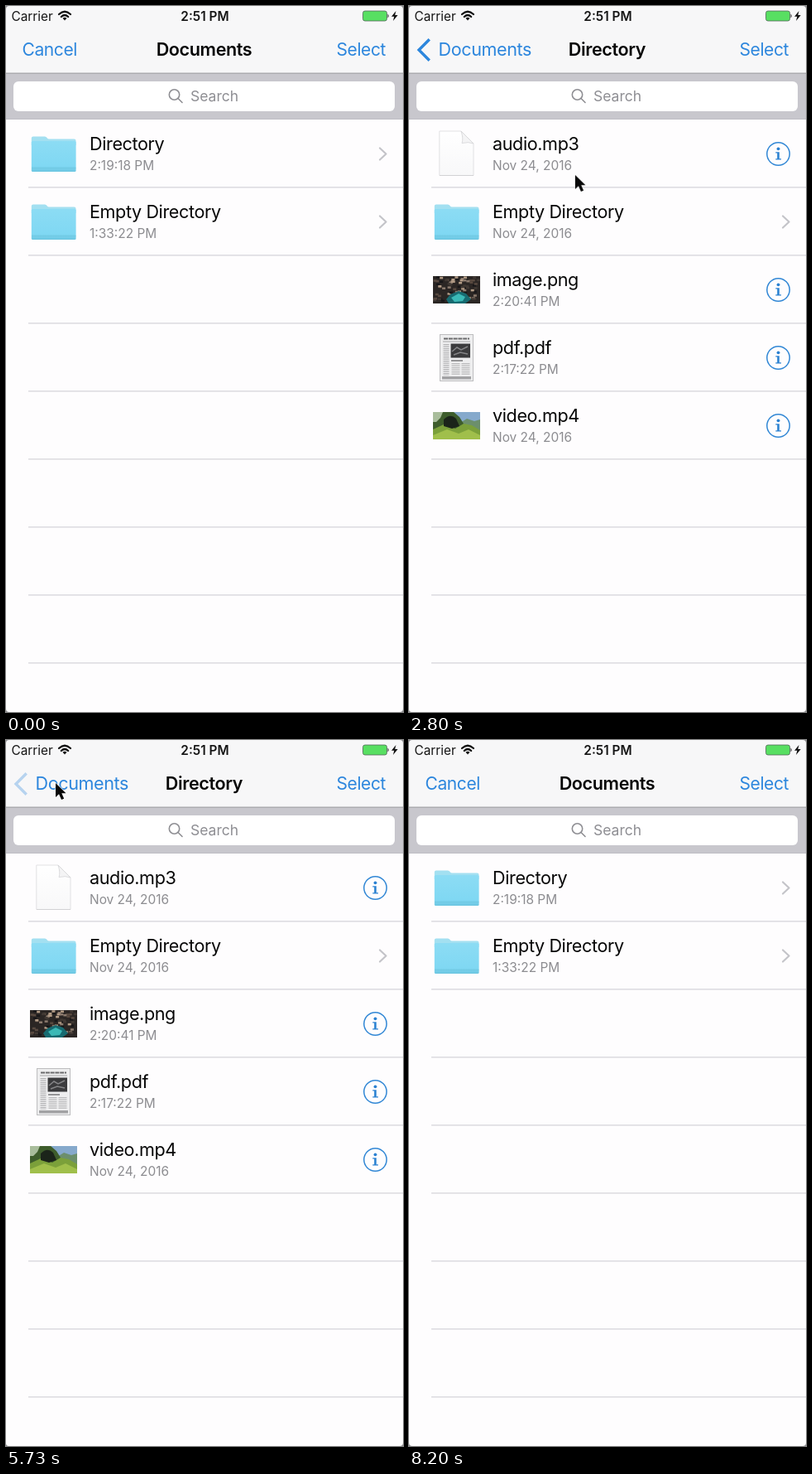
An HTML page for the animation above (8270 ms loop, 480 px wide and 852 px high).

```html
<!DOCTYPE html>
<html lang="en">
<head>
<meta charset="utf-8">
<title>File browser</title>
<style>
  html, body { margin: 0; width: 100%; height: 100%; overflow: hidden; background: #8d8d90; }
  svg { display: block; }
  #stage { width: 100%; height: 100%; border-radius: 4px; }
  text { font-family: Inter, Roboto, sans-serif; }
  .name, .bar { font-size: 21.6px; letter-spacing: -.4px; fill: #060606; }
  .action { font-size: 21px; }
  .sub { font-size: 15.45px; fill: #8c8c90; }
  .status { font-size: 15.35px; fill: #151515; }
  .hint { font-size: 17.5px; fill: #8e8e93; }
  .bold { font-weight: 600; }
  .blue { fill: #2c86dd; }
  .mid { text-anchor: middle; }
  .line { fill: none; stroke-linecap: round; stroke-linejoin: round; }
</style>
</head>
<body>
<svg id="stage" viewBox="0 0 480 852" preserveAspectRatio="none">
  <defs>
    <linearGradient id="shade"><stop offset="0" stop-opacity="0"/><stop offset="1" stop-opacity=".045"/></linearGradient>
    <linearGradient id="sky" x2="0" y2="1"><stop offset="0" stop-color="#8cdcf4"/><stop offset=".8" stop-color="#80d8f3"/><stop offset="1" stop-color="#6cc6e1"/></linearGradient>
    <linearGradient id="paper" x2="0" y2="1"><stop offset="0" stop-color="#fff"/><stop offset="1" stop-color="#f8f8f9"/></linearGradient>

    <g id="folder">
      <path d="M30.800 164V159.500q0-2 2-2H47q1.500 0 2.500 1.500T52 160.500H82.500q2 0 2 2V168H30.800z" fill="#a3e0f1"/>
      <rect x="30.800" y="163" width="53.800" height="37" rx="1.500" fill="url(#sky)"/>
      <path d="M31 195.500H84.500" stroke="#6cc4de" stroke-width=".7"/>
    </g>
    <g id="audio">
      <path d="M36.800 151H63L78 166V204.500H36.800z" fill="url(#paper)" stroke="#e1e1e3"/>
      <path d="M63 151Q66 160 64 165.500Q72 163.500 78 166z" fill="#f4f4f5" stroke="#d3d3d6" stroke-width=".8"/>
      <path d="M37 204.500H78" stroke="#cfcfd1" stroke-width=".8"/>
    </g>
    <g id="image">
      <rect x="29" y="162" width="57" height="33" fill="#2b2624"/>
      <g id="rocks"></g>
      <path d="M45 190L50 184L60 180L69 183L75 190L68 195H48z" fill="#176a70"/>
      <path d="M51 188L60 183L68 187L65 192L55 193z" fill="#3bb9b6"/>
    </g>
    <g id="pdf">
      <rect x="37.500" y="150.500" width="40" height="56" fill="#eeeeef" stroke="#bdbdbf"/>
      <path d="M42 155.500H73" stroke="#6a6a6c" stroke-width="2.200" stroke-dasharray="5 .8"/>
      <path d="M41 159H74" stroke="#a5a5a7"/>
      <path d="M45 162V200" stroke="#b4b4b6" stroke-width="7" stroke-dasharray="1.300 1.200"/>
      <rect x="50.500" y="161.500" width="23.500" height="17" fill="#3b3b3d"/>
      <path d="M52 171l6-5 5 3 8-4M54 175l8-3 9 2" stroke="#858587" fill="none" stroke-width="1.500"/>
      <path d="M51 182H65" stroke="#77777a" stroke-width="1.500"/>
      <path d="M56.500 185V200M68.500 185V200" stroke="#bababc" stroke-width="10" stroke-dasharray="1.300 1.200"/>
      <rect x="40" y="201" width="35" height="3.500" fill="#a2a2a4"/>
    </g>
    <g id="video">
      <rect x="29" y="162" width="57" height="33" fill="#86a9cc"/>
      <path d="M62 175L70 170L79 173L86 171V184H60z" fill="#6c8f6c"/>
      <path d="M29 162H54L61 168L66 176L62 186H29z" fill="#3e5d2c"/>
      <path d="M29 162H41L38 169L33 174H29z" fill="#a9bd9c"/>
      <path d="M29 183L42 177L56 182L66 176L76 178L86 184V195H29z" fill="#7ba03a"/>
      <path d="M29 190L46 183L60 188L72 183L86 190V195H29z" fill="#a0bf4b"/>
      <path d="M42 171q8-8 15-1l4 9-9 3-10-3z" fill="#1b241a"/>
    </g>

    <path id="next" class="line" d="M452 171.500L459.500 178.500L452 185.500" stroke="#c4c4c9" stroke-width="2.200"/>
    <g id="info">
      <circle cx="446.500" cy="178.500" r="13.700" fill="none" stroke="#3187d5" stroke-width="1.500"/>
      <circle cx="446.500" cy="172.300" r="1.900" fill="#2c82d2"/>
      <path d="M443.300 176.200H447.800V184.300H450V185.500H443.300V184.300H445.200V177.400H443.300z" fill="#2c82d2"/>
    </g>
    <g id="search">
      <rect y="82" width="480" height="55" fill="#c8c7cd"/>
      <rect y="136" width="480" height="1" fill="#bfbec4"/>
      <rect x="9" y="91" width="461" height="36" rx="6" fill="#fff"/>
      <g class="line" stroke="#8e8e93" stroke-width="1.600"><circle cx="203.500" cy="107" r="6.200"/><path d="M208 111.500L213 116.500"/></g>
      <text class="hint" x="223" y="115">Search</text>
    </g>
  </defs>

  <g id="pages"></g>

  <rect width="480" height="81" fill="#f7f7f8"/>
  <rect y="80.500" width="480" height="1.500" fill="#acacb0"/>
  <text class="status" x="6.500" y="17.500">Carrier</text>
  <g class="line" stroke="#111" stroke-width="2.200" stroke-linecap="butt">
    <path d="M64 10Q71 3.500 78 10M66.800 13Q71 9 75.200 13"/>
  </g>
  <path d="M68.500 14.800Q71 12.800 73.500 14.800L71 17.500z" fill="#111"/>
  <text class="status bold mid" x="240.500" y="17.500">2:51 PM</text>
  <rect x="431.500" y="6" width="29" height="12" rx="2.500" fill="#58df62" stroke="#51655a" stroke-width=".8"/>
  <path d="M461.500 9.500q2.500 2.500 0 5z" fill="#333"/>
  <path d="M471.500 6L466 12.800H469.300L468 18L473.700 11H470.300z" fill="#111"/>

  <text class="bar action blue" id="cancel" x="19.500" y="60">Cancel</text>
  <path class="line" id="chevron" d="M23.500 41.500L12 53L23.500 64.500" stroke="#2c86dd" stroke-width="3.400" style="stroke-linecap:square;stroke-linejoin:miter"/>
  <text class="bar blue" id="backDocs" x="35.500" y="60">Documents</text>
  <text class="bar blue" id="backDir" x="35" y="60">Directory</text>
  <text class="bar bold mid" id="titleDocs" x="239.500" y="60">Documents</text>
  <text class="bar bold mid" id="titleDir" x="239.500" y="60">Directory</text>
  <text class="bar bold mid" id="titleEmpty" x="240" y="60">Empty Directory</text>
  <text class="bar action blue" x="459" y="60" text-anchor="end">Select</text>

  <path id="cursor" d="M0 0V17L4 13.300L7 20L10.200 18.700L7.300 12.200H12.500z" fill="#080808" stroke="#fff" stroke-width="1.200" paint-order="stroke"/>
</svg>

<script>
  const LOOP = 8270, SLIDE = 540;
  const PUSH1 = 1630, PUSH2 = 3130, POP1 = 4465, POP2 = 5735;
  const SLIDE_EASE = 'cubic-bezier(.36,.66,.04,1)';

  let seed = 7;
  const random = () => (seed = seed * 16807 % 2147483647) / 2147483647;

  const tones = ['#8b7a6d', '#594a40', '#171618', '#b39c86', '#403833'];
  document.getElementById('rocks').innerHTML = Array.from({ length: 70 }, (_, i) => {
    const x = 29 + random() * 53, y = 162 + random() ** 1.4 * 30;
    return `<rect x="${x}" y="${y}" width="4" height="2.500" fill="${tones[i % tones.length]}"/>`;
  }).join('');

  const row = ([icon, name, sub], i) => `
    <g transform="translate(0 ${i * 82})">
      <use href="#${icon}"/>
      <text class="name" x="101" y="173.500">${name}</text>
      <text class="sub" x="101" y="197.500">${sub}</text>
      <use href="#${icon === 'folder' ? 'next' : 'info'}"/>
    </g>`;

  const lines = Array.from({ length: 8 }, (_, i) =>
    `<rect x="27" y="${218 + i * 82}" width="453" height="1.600" fill="#dedde2"/>`).join('');

  const page = (id, rows) => `
    <g id="${id}">
      <rect id="${id}Edge" x="-9" y="82" width="9" height="770" fill="url(#shade)"/>
      <rect y="82" width="480" height="770" fill="#fefdfe"/>
      <use href="#search"/>${lines}${rows.map(row).join('')}
      <rect id="${id}Dim" y="82" width="480" height="770" opacity="0"/>
    </g>`;

  const day = 'Nov 24, 2016';
  document.getElementById('pages').innerHTML =
    page('docs', [['folder', 'Directory', '2:19:18 PM'], ['folder', 'Empty Directory', '1:33:22 PM']]) +
    page('dir', [
      ['audio', 'audio.mp3', day], ['folder', 'Empty Directory', day],
      ['image', 'image.png', '2:20:41 PM'], ['pdf', 'pdf.pdf', '2:17:22 PM'], ['video', 'video.mp4', day]
    ]) +
    page('empty', []);

  // Builds CSS keyframes from [ms, value] stops; values hold before the first and after the last.
  const sheet = [], tracks = {};
  function track(id, prop, ease, stops, css) {
    const all = [[0, stops[0][1]], ...stops, [LOOP, stops[stops.length - 1][1]]];
    const frames = all.map(([t, v]) => `${(t / LOOP * 100).toFixed(4)}%{${prop}:${css(v)}}`);
    const name = `${id}-${prop}`;
    sheet.push(`@keyframes ${name}{${frames.join('')}}`);
    (tracks[id] ||= []).push(`${name} ${LOOP}ms ${ease} infinite`);
  }

  // Moves through positions, one slide per start time.
  const slides = (start, moves) => moves.flatMap(([t, to], i) =>
    [[t, i ? moves[i - 1][1] : start], [t + SLIDE, to]]);
  const slide = (id, start, ...moves) =>
    track(id, 'transform', SLIDE_EASE, slides(start, moves), v => `translateX(${v}px)`);
  const dim = (id, max, on, off) =>
    track(id, 'opacity', SLIDE_EASE, slides(0, [[on, max], [off, 0]]), v => v);

  // Each fade is [start, end, opacity reached].
  const fade = (id, start, ...steps) => track(id, 'opacity', 'linear',
    steps.flatMap(([a, b, v], i) => [[a, i ? steps[i - 1][2] : start], [b, v]]), v => v);
  const out = t => [t, t + 150, 0];
  const titleIn = t => [t + 110, t + 280, 1];
  const backIn = t => [t + 280, t + 338, 1];
  const popIn = t => [t + 160, t + 290, 1];

  slide('docs', 0, [PUSH1, -144], [POP2, 0]);
  slide('dir', 480, [PUSH1, 0], [PUSH2, -144], [POP1, 0], [POP2, 480]);
  slide('empty', 480, [PUSH2, 0], [POP1, 480]);
  dim('docsDim', .1, PUSH1, POP2);
  dim('dirEdge', 1, PUSH1, POP2);
  dim('dirDim', .1, PUSH2, POP1);
  dim('emptyEdge', 1, PUSH2, POP1);

  fade('cancel', 1, out(PUSH1), popIn(POP2));
  fade('chevron', 0, backIn(PUSH1), [5690, 5750, 0]);

  slide('titleDocs', 0, [PUSH1, -148], [POP2, 0]);
  fade('titleDocs', 1, out(PUSH1), popIn(POP2));
  slide('backDocs', 90, [PUSH1, 0], [PUSH2, -190], [POP1, 0], [POP2, 148]);
  fade('backDocs', 0, backIn(PUSH1), out(PUSH2), popIn(POP1), out(POP2));
  slide('titleDir', 236, [PUSH1, 0], [PUSH2, -165], [POP1, 0], [POP2, 236]);
  fade('titleDir', 0, titleIn(PUSH1), out(PUSH2), [POP1 + 180, POP1 + 310, 1], out(POP2));
  slide('backDir', 60, [PUSH2, 0], [POP1, 160]);
  fade('backDir', 0, backIn(PUSH2), out(POP1));
  slide('titleEmpty', 100, [PUSH2, 0], [POP1, 236]);
  fade('titleEmpty', 0, titleIn(PUSH2), out(POP1));

  track('cursor', 'transform', 'ease-in-out', [
    [350, [290, -30]], [1050, [218, 175]], [1500, [214, 171]], [2550, [214, 171]],
    [3000, [192, 226]], [3130, [192, 226]], [3440, [191, 217]], [3650, [191, 217]],
    [4250, [59, 61]], [4700, [59, 61]], [5300, [60, 52]], [5950, [60, 52]],
    [6800, [266, 842]], [6870, [270, 880]]
  ], ([x, y]) => `translate(${x}px,${y}px)`);

  for (const id in tracks) sheet.push(`#${id}{animation:${tracks[id].join(',')}}`);
  document.head.appendChild(document.createElement('style')).textContent = sheet.join('\n');
</script>
</body>
</html>
```
